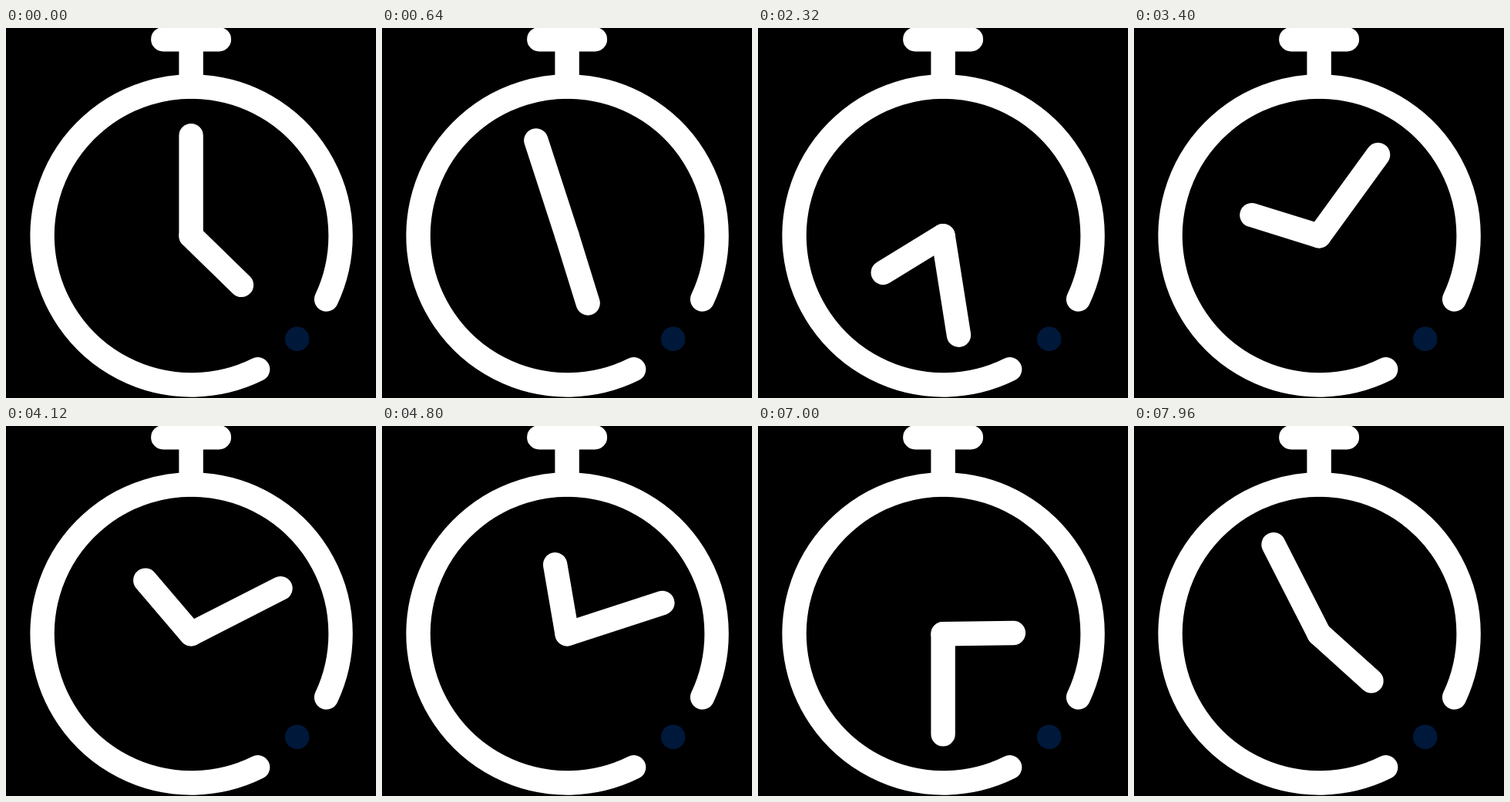
An HTML page that plays this animation: 480x480 px, repeating every 8000 ms.

```html
<!DOCTYPE html>
<html lang="en">
<head>
<meta charset="utf-8">
<title>Stopwatch</title>
<style>
  html, body { margin: 0; width: 100%; height: 100%; overflow: hidden; background: #000; }
  svg { display: block; width: 100vw; height: 100vh; }
  .line { fill: none; stroke: #fff; stroke-width: 31.4; stroke-linecap: round; }
</style>
</head>
<body>
<svg viewBox="0 0 480 480">
  <g class="line">
    <path d="M203.8 14.7H276.4M240.1 14.7V76"/>
    <path d="M415.6 352A193.5 193.5 0 1 0 326.6 442.8"/>
    <path id="long" d="M240.1 269.7V139.6"/>
    <path id="short" d="M240.1 269.7V178.4"/>
  </g>
  <circle cx="377.7" cy="403.4" r="15.8" fill="#00183a"/>
</svg>
<script>
  const LOOP = 8000;
  const FRAME = 40;
  const TICKS_PER_SECOND = 60;
  const hands = [
    { el: document.getElementById('long'), start: 0, step: 9 },
    { el: document.getElementById('short'), start: 134.25, step: 0.75 }
  ];
  const begin = performance.now();

  function draw() {
    const time = (performance.now() - begin) % LOOP;
    const shown = Math.floor(time / FRAME) * FRAME;
    // The hands advance on whole 1/60 s ticks, shown every 40 ms.
    const tick = Math.floor(shown * TICKS_PER_SECOND / 1000);
    for (const { el, start, step } of hands) {
      el.setAttribute('transform', `rotate(${start + step * tick} 240.1 269.7)`);
    }
    requestAnimationFrame(draw);
  }

  draw();
</script>
</body>
</html>
```
